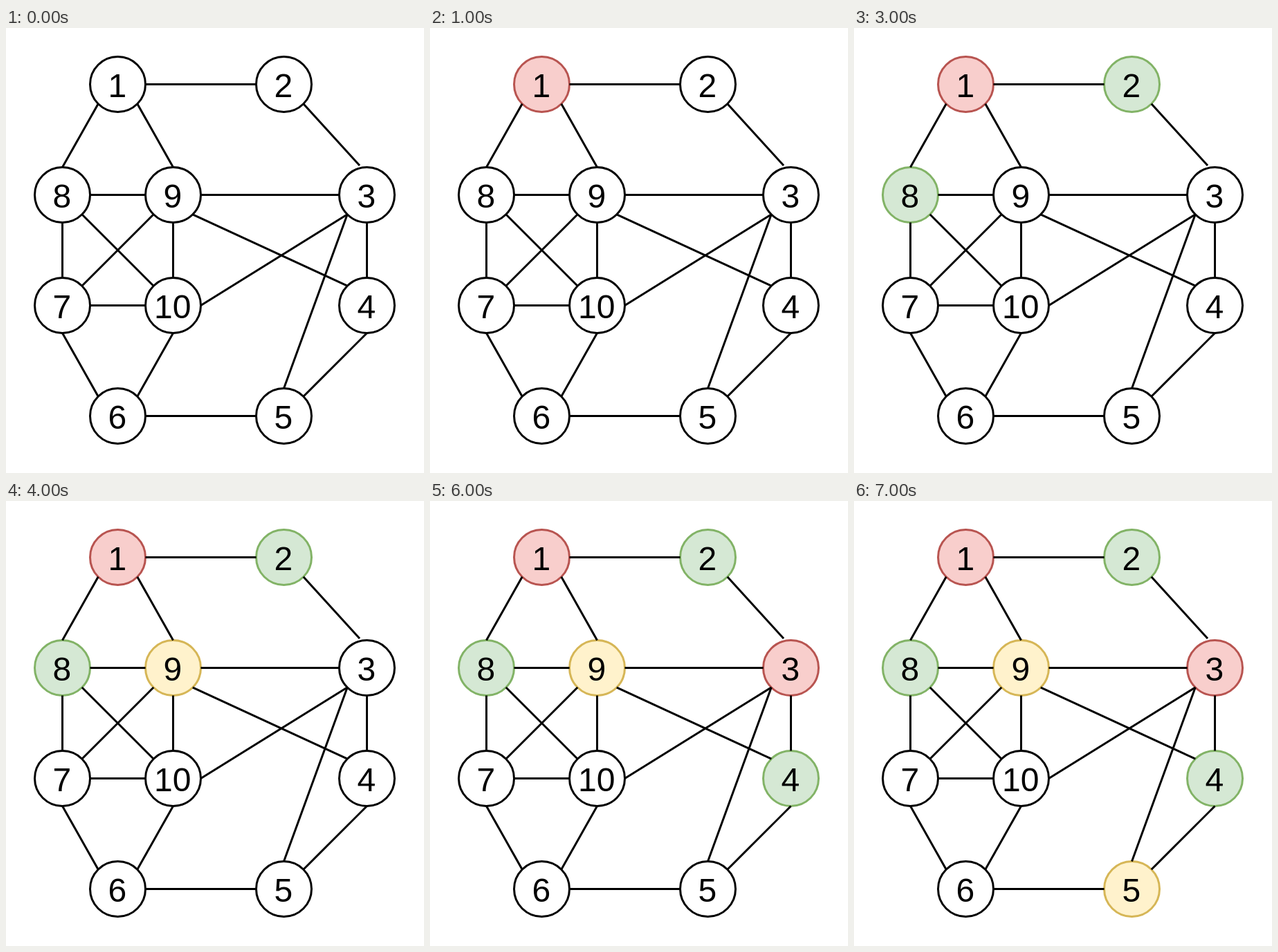
Animation of 604x644 px, one loop 8000 ms. Source, as an HTML page:

```html
<!DOCTYPE html>
<html lang="en">
<head>
<meta charset="utf-8">
<title>Graph colouring</title>
<style>
  html, body { margin: 0; width: 100%; height: 100%; overflow: hidden; background: #fff; }
  svg { display: block; width: 604px; height: 644px; }
  circle, line { stroke-width: 3; }
  line { stroke: #000; }
  text { font: 48px "Liberation Sans", Helvetica, Arial, sans-serif; text-anchor: middle; }
</style>
</head>
<body>
<svg id="stage" viewBox="0 0 604 644"></svg>
<script>
const stage = document.getElementById('stage');
const R = 40, D = R * Math.SQRT1_2;

const nodes = {
  1: [161.5, 81.5], 2: [401.5, 81.5], 3: [521.5, 241.5], 4: [521.5, 401.5], 5: [401.5, 561.5],
  6: [161.5, 561.5], 7: [81.5, 401.5], 8: [81.5, 241.5], 9: [241.5, 241.5], 10: [241.5, 401.5]
};

// Node, side it leaves from, node, side it arrives at
const edges = `1 e 2 w, 1 sw 8 n, 1 se 9 n, 2 se 3 top, 8 e 9 w, 9 e 3 w, 8 s 7 n, 9 s 10 n,
  7 e 10 w, 8 se 10 nw, 9 sw 7 ne, 9 se 4 nw, 3 sw 10 e, 3 sw 5 n, 3 s 4 n,
  4 s 5 ne, 7 s 6 nw, 10 s 6 ne, 6 e 5 w`;
const sides = {
  n: [0, -R], s: [0, R], e: [R, 0], w: [-R, 0],
  ne: [D, -D], nw: [-D, -D], se: [D, D], sw: [-D, D], top: [-10.5, -42.5]
};

const white = ['#fff', '#000'], red = ['#f8cecc', '#b85450'],
      green = ['#d5e8d4', '#82b366'], yellow = ['#fff2cc', '#d6b656'];
// One node is coloured each second, starting at 1 s
const steps = [[1, red], [2, green], [8, green], [9, yellow], [3, red], [4, green], [5, yellow]];

function add(tag, attrs, label = '') {
  const el = document.createElementNS('http://www.w3.org/2000/svg', tag);
  for (const key in attrs) el.setAttribute(key, attrs[key]);
  el.textContent = label;
  return stage.appendChild(el);
}

const circles = {};
for (const id in nodes) {
  const [x, y] = nodes[id];
  circles[id] = add('circle', { cx: x, cy: y, r: R, fill: white[0], stroke: white[1] });
  add('text', { x: x - 0.7, y: y + 18 }, id);
}

const anchor = (id, side) => nodes[id].map((v, i) => v + sides[side][i]);
for (const edge of edges.split(',')) {
  const [a, from, b, to] = edge.trim().split(' ');
  const [x1, y1] = anchor(a, from), [x2, y2] = anchor(b, to);
  add('line', { x1, y1, x2, y2 });
}

function draw() {
  const second = Math.floor(performance.now() % 8000 / 1000);
  steps.forEach(([id, color], i) => {
    const [fill, stroke] = i < second ? color : white;
    circles[id].setAttribute('fill', fill);
    circles[id].setAttribute('stroke', stroke);
  });
  requestAnimationFrame(draw);
}
draw();
</script>
</body>
</html>
```
